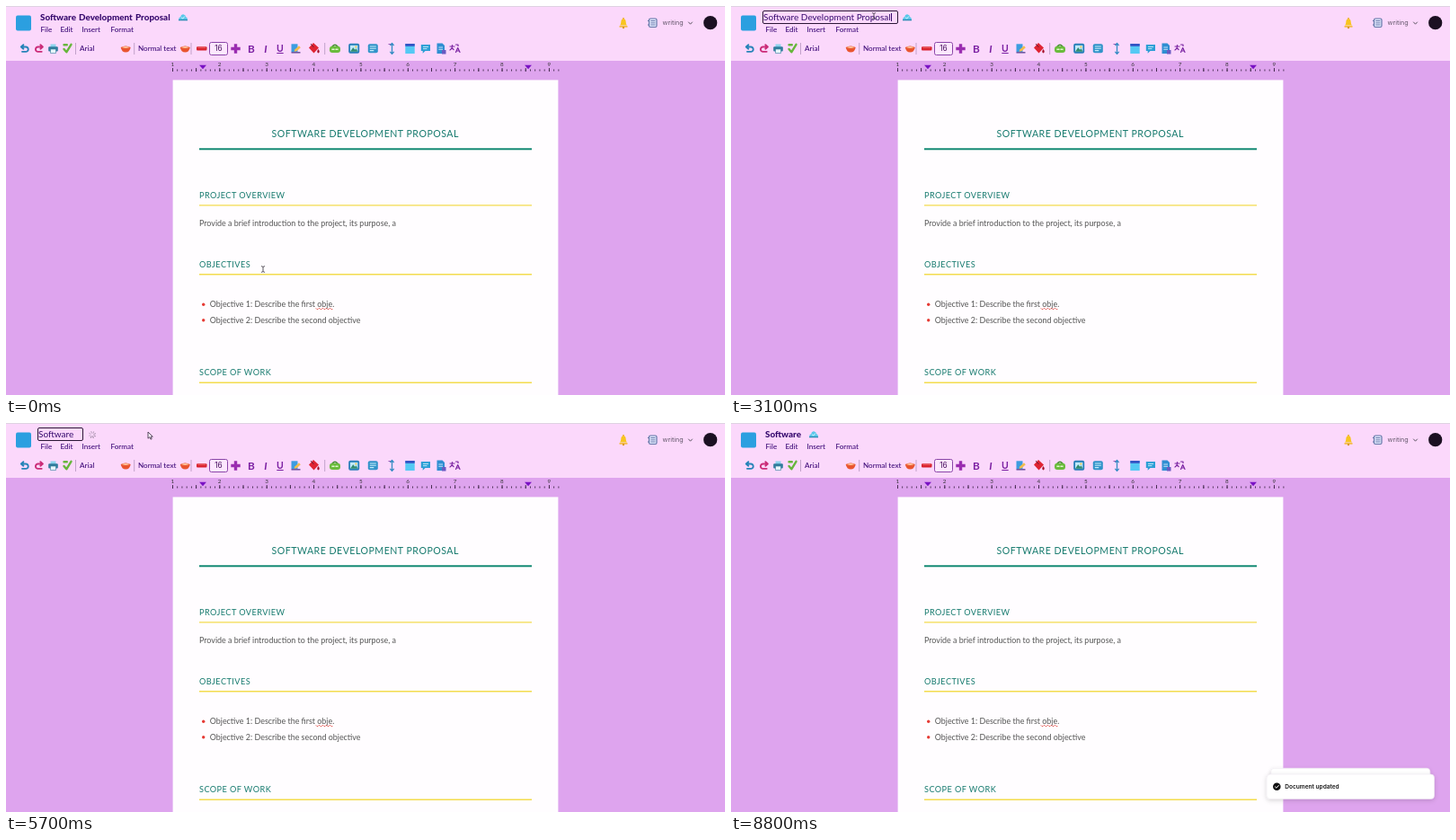
Animation of 800 by 433 pixels, one loop 8.9 s. Source, as an HTML page:

```html
<!DOCTYPE html>
<html lang="en">
<head>
<meta charset="utf-8">
<title>Document editor</title>
<style>
  html, body { margin: 0; width: 100%; height: 100%; overflow: hidden; background: #dea4ee; }
  #stage { position: absolute; left: 0; top: 0; width: 800px; height: 433px; overflow: hidden; }
  svg { position: absolute; left: 0; top: 0; display: block; overflow: visible; }
  text, #titlebar { font-family: Lato, sans-serif; white-space: pre; }
  .menu { font-size: 8.1px; font-weight: 500; fill: #3d0a78; }
  .heading { font-size: 9.2px; letter-spacing: .42px; fill: #167a6e; }
  .body { font-size: 8.93px; fill: #555; }
  .ruler { font: 6.3px Inter, sans-serif; fill: #333; text-anchor: middle; }
  .style { font: bold 11.8px Inter, sans-serif; fill: #7b1fa2; text-anchor: middle; }
  .line { fill: none; stroke-linecap: round; stroke-linejoin: round; }
  #titlebar { position: absolute; left: 35px; top: 5px; height: 15px; display: flex; align-items: center; }
  #name { box-sizing: border-box; height: 15px; line-height: 14.5px; padding: 0 0 0 3px; color: #35086d;
          font-size: 9.9px; font-weight: 800; word-spacing: .8px; border-radius: 2px; }
  #name.editing { padding: 0 7px 0 0; border: 1.4px solid #2b1636; font-size: 10px; font-weight: 400;
                  word-spacing: 0; line-height: 13px; }
  #caret { display: inline-block; width: 1px; height: 9px; margin-right: -1px; background: #35086d; vertical-align: -1px; }
  #status { position: relative; width: 12px; height: 12px; margin-left: 8px; }
  #name.editing + #status { margin-left: 4px; }
</style>
</head>
<body>
<div id="stage">
  <svg width="800" height="433" viewBox="0 0 800 433">
    <defs>
      <filter id="shadow" x="-10%" y="-40%" width="120%" height="200%">
        <feDropShadow dx="0" dy="1.5" stdDeviation="2.5" flood-color="#000" flood-opacity=".16"/>
      </filter>
      <g id="bowl">
        <path d="M-5.5-1.5Q0-4.5 5.5-1.5Q4.5 4 0 4T-5.5-1.5Z" fill="#e9552f"/>
        <path d="M-4.5-1.4Q0-3.6 4.5-1.4Q0 .6-4.5-1.4Z" fill="#ffc39a"/>
      </g>
      <g id="curl" class="line">
        <path d="M-3 3.5H1.5A3 3 0 0 0 1.5-2.5H-4M-1.5-5L-4.3-2.4L-1.5 0" stroke-width="2.1"/>
      </g>
    </defs>

    <rect width="800" height="433" fill="#dea4ee"/>
    <rect width="800" height="61" fill="#fbd8fb"/>
    <rect width="800" height="1" fill="#dfd3e2"/>

    <!-- header -->
    <rect x="11" y="10.5" width="17" height="17" rx="2" fill="#2b9fe0"/>
    <g class="menu">
      <text x="38.5" y="29.3">File</text><text x="60.5" y="29.3">Edit</text>
      <text x="84.5" y="29.3">Insert</text><text x="116.5" y="29.3">Format</text>
      <text x="82" y="50.3">Arial</text><text x="147" y="50.3">Normal text</text>
    </g>
    <path d="M683 21.5Q684.3 20.5 684.3 17.8Q684.3 14.5 687 14.2Q689.7 14.5 689.7 17.8Q689.7 20.5 691 21.5Z" fill="#f8c51f"/>
    <circle cx="687" cy="13.8" r=".9" fill="#e9a80e"/>
    <path d="M682.5 22.2H691.5V23.6H682.5Z" fill="#f3b41a"/>
    <circle cx="687" cy="24.2" r="1.1" fill="#d9930e"/>
    <g class="line" stroke="#6577a8">
      <rect x="715.5" y="14" width="8.5" height="9.5" rx="1.5" fill="#dce3fa" stroke-width="1.2"/>
      <path d="M717.7 16.5H722M717.7 18.8H722M717.7 21H722" stroke-width=".9"/>
      <path d="M714.3 16.5H715.5M714.3 21H715.5"/>
      <path d="M759.5 18L761.5 20.2L763.5 18" stroke="#5e5564" stroke-width="1"/>
    </g>
    <text x="730.5" y="21.3" style="font:7.2px Inter,sans-serif" fill="#62566a">writing</text>
    <circle cx="783.7" cy="18.7" r="7.6" fill="#1b1022"/>

    <!-- toolbar -->
    <path d="M77.5 41V54M142.7 41V54M206 41V54M354.7 41V54" stroke="#bb9cc5" stroke-width=".9"/>
    <use href="#curl" transform="translate(20.7 47.7) scale(.9)" stroke="#2683b8"/>
    <use href="#curl" transform="translate(37 47.7) scale(-.9 .9)" stroke="#cb2b78"/>
    <g transform="translate(52.5 47.5)">
      <path d="M-3-5H3V-1H-3Z" fill="#8dd3ed"/>
      <rect x="-5.3" y="-2.2" width="10.6" height="5.2" rx="1" fill="#317d9d"/>
      <path d="M-3 .5H3V5H-3Z" fill="#e6f6fb" stroke="#317d9d" stroke-width=".6"/>
    </g>
    <path class="line" d="M64.5 48L67.3 51.3L72.5 42.8M64.5 43.2H67.8" stroke="#67b63c" stroke-width="2.4"/>
    <use href="#bowl" x="133.2" y="47.5"/>
    <use href="#bowl" x="199.3" y="47.5"/>
    <rect x="212" y="45.2" width="11.5" height="4.4" rx="1" fill="#d92330"/>
    <path d="M213.5 46.3H222" stroke="#f4736f" stroke-width=".8"/>
    <rect x="226.5" y="40.5" width="20" height="14" rx="2" fill="#fde7fe" stroke="#8a45a8" stroke-width="1"/>
    <text x="236.5" y="50.3" style="font:8.3px Inter,sans-serif" text-anchor="middle" fill="#47105f">16</text>
    <path d="M255.5 42.3V52.7M250.3 47.5H260.7" stroke="#9a2cb0" stroke-width="3.4"/>
    <g class="style">
      <text x="273" y="51.6">B</text><text x="289" y="51.6" font-style="italic">I</text>
      <text x="305" y="50.5" style="font-size:10.5px">U</text>
    </g>
    <path d="M301.3 52.5H308.7" stroke="#7b1fa2" stroke-width="1"/>
    <g transform="translate(322.5 47.3)">
      <path d="M-5-5H2V4H-5Z" fill="#3d9ce0"/><path d="M-1 1L3.5-3L5.3-1L1 3L-2 3.5Z" fill="#f2bc4d"/>
      <path d="M-5 4.5H5" stroke="#69509e" stroke-width="1.5"/>
    </g>
    <path d="M337 46.5L342 41L348 46.5L342.5 52.5Z" fill="#df2433"/>
    <path class="line" d="M339.5 42.5L342 45.5" stroke="#5e1731"/>
    <path d="M347.5 48Q350 51.5 347.5 52.4Q345 51.5 347.5 48Z" fill="#a5112a"/>
    <g transform="translate(366 47.3)">
      <path class="line" d="M-3-2Q0-6 3-2" stroke="#438d31" stroke-width="1.6"/>
      <rect x="-6" y="-2.5" width="12" height="7.2" rx="3" fill="#6abb3c"/>
      <path class="line" d="M-3 1H-1M1 1H3" stroke="#e1f8cc" stroke-width="1.5"/>
    </g>
    <g transform="translate(387.2 47.3)">
      <rect x="-6" y="-5.5" width="12" height="11" rx="2" fill="#287fb9"/>
      <path d="M-4.2-3.5H4.2V3.4H-4.2Z" fill="#bfe9fa"/><path d="M-4.2 3.4L-1-1L1.2 1.4L2.4 0L4.2 3.4Z" fill="#328c70"/>
      <circle cx="2.2" cy="-1.8" r="1" fill="#f9c438"/>
    </g>
    <g transform="translate(408.3 47.3)">
      <rect x="-5.5" y="-5" width="11" height="10" rx="2" fill="#3293c9"/>
      <path d="M-3.5-2.3H3.5M-3.5 0H3.5M-3.5 2.3H1" stroke="#c3edfa" stroke-width="1.1"/>
    </g>
    <path class="line" d="M429.5 42V53M427.7 43.6L429.5 41.5L431.3 43.6M427.7 51.3L429.5 53.4L431.3 51.3" stroke="#328bc3" stroke-width="1.3"/>
    <path d="M425.5 42.5H428" stroke="#8b4fae" stroke-width=".9"/>
    <rect x="444.3" y="42" width="10.4" height="11" fill="#55c9f4"/>
    <rect x="444.3" y="42" width="10.4" height="2.8" fill="#3453c4"/>
    <path d="M461.8 43H472V50H466.5L463.7 52.7V50H461.8Z" fill="#2d9ed5"/>
    <path d="M464 45.4H470M464 47.6H468.5" stroke="#d2f2fd" stroke-width=".9"/>
    <path d="M479.5 41.5H485.5L488 44V53H479.5Z" fill="#2f8ed2"/>
    <path d="M481.3 46H486M481.3 48.3H486" stroke="#d2eafd" stroke-width=".9"/>
    <path d="M485 49H489.5V53.5H485Z" fill="#695ac2"/>
    <g class="line" stroke="#7b24a2" stroke-width="1.2">
      <path d="M494 45H499M496.5 43.5V45Q496 48 494 49M496 46.5L498 48.5"/>
      <path d="M500.5 51.5L502.7 46.5L505 51.5M501.5 50H504M500.5 43H503V44.5"/>
    </g>

    <!-- ruler -->
    <g id="numbers" class="ruler"></g>
    <path d="M185 71.5H615.5" stroke="#40284a" stroke-width="2" stroke-dasharray=".9 4.337"/>
    <path d="M185 71H615.5" stroke="#40284a" stroke-width="4" stroke-dasharray=".9 25.285"/>
    <path d="M215 65.7H223L219 70.3ZM577 65.7H585L581 70.3Z" fill="#7a12c4"/>

    <!-- page -->
    <rect x="185.6" y="82.4" width="428.8" height="360" fill="#fffdff"/>
    <g class="heading">
      <text x="295.5" y="146" style="font-size:10.6px;letter-spacing:.49px">SOFTWARE DEVELOPMENT PROPOSAL</text>
      <text x="215" y="213.8">PROJECT OVERVIEW</text>
      <text x="215" y="290.8">OBJECTIVES</text>
      <text x="215" y="411.3">SCOPE OF WORK</text>
    </g>
    <path d="M215 159.2H585" stroke="#148a74" stroke-width="2"/>
    <path d="M215 221.9H585M215 298.8H585M215 419.3H585" stroke="#f3dc4e" stroke-width="1.4"/>
    <g class="body">
      <text x="215" y="245.3">Provide a brief introduction to the project, its purpose, a</text>
      <text x="226.7" y="335.4">Objective 1: Describe the first obje.</text>
      <text x="226.7" y="352.9">Objective 2: Describe the second objective</text>
    </g>
    <circle cx="219.7" cy="332.3" r="1.7" fill="#e63b35"/>
    <circle cx="219.7" cy="349.8" r="1.7" fill="#e63b35"/>
    <path id="squiggle" class="line" stroke="#e0403c" stroke-width=".8"/>

    <!-- notifications -->
    <g id="toasts"></g>
  </svg>

  <div id="titlebar">
    <span id="name"><span id="typed"></span><i id="caret"></i></span>
    <div id="status">
      <svg id="cloud" width="12" height="12" viewBox="-6 -6 12 12">
        <path d="M-4.8 2Q-5-.6-2.7-.8Q-2.2-4 .8-3.6Q3-3.2 3.2-.8Q5.2-.4 4.8 2Z" fill="#5cc8ea"/>
        <path class="line" d="M-1.6 0L-.3 1L1.6-1.2" stroke="#e9fbff" stroke-width=".9"/>
        <path d="M-5 2.6H5" stroke="#2b8db5" stroke-width="1.4"/>
      </svg>
      <svg id="spinner" width="12" height="12" viewBox="-6 -6 12 12"></svg>
    </div>
  </div>

  <svg width="800" height="433">
    <g id="pointer">
      <path id="arrow" d="M0 0V7.2L1.8 5.7L3 8.2L4.2 7.6L3.1 5.2H5.3Z" fill="#f7effa" stroke="#33263a" stroke-width=".8"/>
      <path id="beam" class="line" d="M-1.7-3.3Q0-3.3 0-2.4Q0-3.3 1.7-3.3M0-2.4V2.4M-1.7 3.3Q0 3.3 0 2.4Q0 3.3 1.7 3.3" stroke="#4b4450" stroke-width=".9"/>
    </g>
  </svg>
</div>

<script>
const LOOP = 8900, STEP = 100;
const FULL = 'Software Development Proposal';
const EDIT_START = 2800, EDIT_END = 6100;
const DELETIONS = [{ start: 3300, count: 8 }, { start: 4300, count: 12 }];
const SAVING = [5500, 6200];
const TOAST_STARTS = [5900, 6250];
// time, x, y of each resting point of the pointer
const PATH = [
  [0, 286, 293], [400, 286, 293], [1600, 162.5, 33.5], [1900, 162.5, 33.5],
  [2500, 159, 11], [3300, 159, 11], [3800, 157, 10], [4200, 158, 10],
  [5800, 158, 10], [6200, 214, 52], [6900, 317.5, 84], [7700, 317.5, 84], [8150, 330, -12], [LOOP, 330, -12]
];

const $ = id => document.getElementById(id);
const clamp = v => Math.min(1, Math.max(0, v));
const easeInOut = v => v * v * (3 - 2 * v);
const easeOut = v => 1 - (1 - v) ** 3;
const show = (el, on) => { el.style.display = on ? '' : 'none'; };
const repeat = (n, make) => Array.from({ length: n }, (_, i) => make(i)).join('');

$('numbers').innerHTML = repeat(9, i => `<text x="${185.3 + i * 52.37}" y="67.3">${i + 1}</text>`);
$('squiggle').setAttribute('d', 'M345 336.6' + repeat(9, i => `l1 ${i % 2 ? -1 : 1}l1 0`));
$('spinner').innerHTML = repeat(8, i =>
  `<path d="M0-2V-3.8" stroke="#85738c" stroke-width=".9" stroke-linecap="round" transform="rotate(${i * 45})" opacity="${.4 + i * .08}"/>`);
$('toasts').innerHTML = repeat(2, () => `<g>
  <rect x="596" y="391" width="186.5" height="27.5" rx="4" fill="#fff" stroke="#ece7ee" stroke-width=".6" filter="url(#shadow)"/>
  <g><circle cx="607.3" cy="404.8" r="4.3" fill="#111"/>
  <path class="line" d="M605.4 404.9L606.8 406.2L609.3 403.5" stroke="#fff" stroke-width="1"/>
  <text x="616.3" y="407.4" style="font:600 6.55px Inter,sans-serif" fill="#171717">Document updated</text></g></g>`);
const toasts = [...$('toasts').children];

function pointerAt(t) {
  const i = PATH.findIndex(p => p[0] > t);
  const [t0, x0, y0] = PATH[i - 1], [t1, x1, y1] = PATH[i];
  const k = easeInOut((t - t0) / (t1 - t0));
  return [x0 + (x1 - x0) * k, y0 + (y1 - y0) * k];
}

function drawTitle(t) {
  const editing = t >= EDIT_START && t < EDIT_END;
  const removed = DELETIONS.reduce((sum, { start, count }) =>
    sum + Math.min(count, Math.max(0, Math.floor((t - start) / STEP))), 0);
  const text = FULL.slice(0, FULL.length - removed);
  const saving = t >= SAVING[0] && t < SAVING[1];
  $('name').className = editing ? 'editing' : '';
  $('typed').textContent = editing ? text : text.trimEnd();
  show($('caret'), editing && (t - EDIT_START) % 1000 < 500);
  show($('cloud'), !saving);
  show($('spinner'), saving);
  $('spinner').style.transform = `rotate(${t * .36}deg)`;
}

function drawPointer(t) {
  const [x, y] = pointerAt(t);
  const overTitle = t >= 2200 && t < 3600;
  const beam = overTitle || (y > 80 && x > 186);
  $('pointer').setAttribute('transform', `translate(${x} ${y})`);
  show($('beam'), beam);
  show($('arrow'), !beam);
}

function drawToasts(t) {
  const [first, second] = TOAST_STARTS.map(s => easeOut(clamp((t - s) / 400)));
  const scale = 1 - .05 * second;
  toasts[0].setAttribute('transform',
    `translate(689.25 ${391 + 44 * (1 - first) - 6.7 * second}) scale(${scale}) translate(-689.25 -391)`);
  toasts[0].lastElementChild.setAttribute('opacity', 1 - second);
  toasts[1].setAttribute('transform', `translate(0 ${44 * (1 - second)})`);
  toasts.forEach((toast, i) => show(toast, t >= TOAST_STARTS[i]));
}

function draw(t) {
  drawTitle(t);
  drawPointer(t);
  drawToasts(t);
}

const begin = performance.now();
function tick() {
  const elapsed = (performance.now() - begin) % LOOP;
  draw(Math.floor(elapsed / STEP) * STEP);
  requestAnimationFrame(tick);
}
tick();
</script>
</body>
</html>
```
